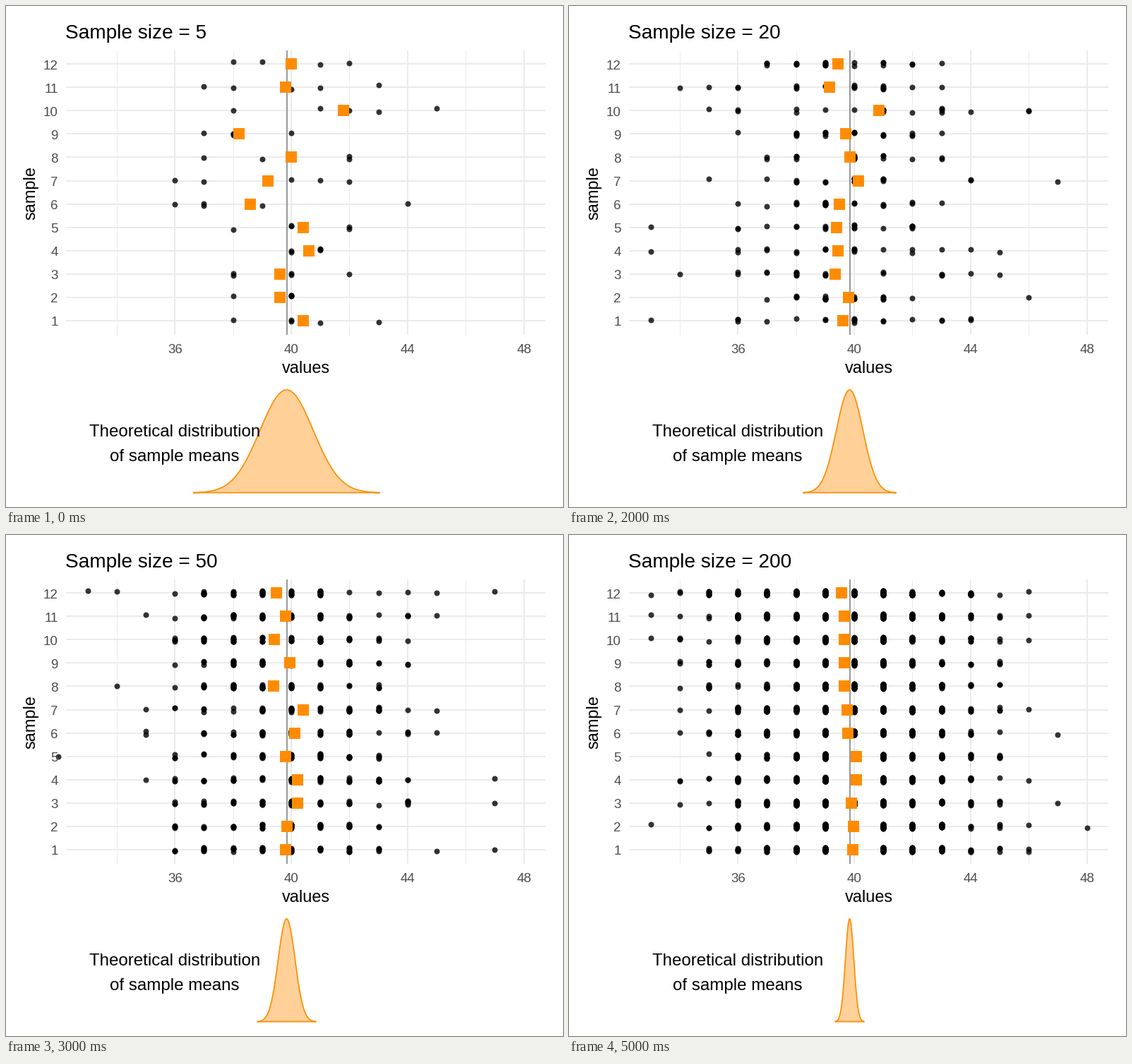
These frames come from a looping animation (789x710 px, 6000 ms). A matplotlib script:

```python
import matplotlib.pyplot as plt
import numpy as np
from matplotlib.animation import FuncAnimation

W, H, DPI = 789, 710, 64
PT = 72 / DPI  # points per pixel
ORANGE, GRID, GREY = "#FF8C00", "#EBEBEB", "#4D4D4D"
TOP, BOTTOM = 63, 466  # panel edges
MEAN, SD = 39.84, 2.15
JITTER = 3.2
ROWS = np.arange(12, 0, -1)

# Mean of each sample, from number 12 down to 1, by sample size.
MEANS = {
    5: [40, 39.8, 41.8, 38.2, 40, 39.2, 38.6, 40.4, 40.6, 39.6, 39.6, 40.4],
    10: [40.4, 39.3, 40.4, 39.7, 39.7, 39.7, 40.3, 39.2, 40.6, 39.9, 39.6, 39.6],
    20: [39.45, 39.15, 40.85, 39.7, 39.85, 40.15, 39.5, 39.4, 39.45, 39.35, 39.8, 39.6],
    50: [39.5, 39.8, 39.42, 39.96, 39.38, 40.4, 40.12, 39.8, 40.22, 40.22, 39.84, 39.8],
    100: [39.6, 40.16, 39.87, 40.27, 39.71, 39.6, 39.9, 39.32, 40.34, 39.89, 39.71, 39.71],
    200: [39.57, 39.65, 39.66, 39.66, 39.65, 39.76, 39.79, 40.08, 40.07, 39.9, 39.97, 39.94],
}
SIZES = list(MEANS)


def px(v):
    return 239.3 + (np.asarray(v) - 36) * 41.2


def py(row):
    return 445.8 - (np.asarray(row) - 1) * 33.05


def draw_sample(n, mean, rng):
    """Whole-number draws nudged until they have the given mean."""
    values = np.rint(rng.normal(mean, SD, n))
    gap = int(round(mean * n - values.sum()))
    for k in rng.integers(0, n, abs(gap)):
        values[k] += np.sign(gap)
    return values


def all_dots(n):
    rng = np.random.default_rng(n)
    x, y = [], []
    for row, mean in zip(ROWS, MEANS[n]):
        x.extend(px(draw_sample(n, mean, rng)))
        y.extend(py(row) + rng.uniform(-JITTER, JITTER, n))
    return x, y


def bell(n):
    z = np.linspace(-3.5, 3.5, 240)
    x = px(MEAN + z * 2.05 / np.sqrt(n))
    return np.column_stack([x, 690 - 146 * np.exp(-z ** 2 / 2)])


DOTS = {n: all_dots(n) for n in SIZES}

plt.rcParams["font.family"] = "Liberation Sans"
fig = plt.figure(figsize=(W / DPI, H / DPI), dpi=DPI, facecolor="white")
ax = fig.add_axes([0, 0, 1, 1])
ax.set(xlim=(0, W), ylim=(H, 0))
ax.axis("off")


def line(x, y, width, color=GRID, z=1):
    ax.plot(x, y, color=color, lw=width * PT, zorder=z, solid_capstyle="butt")


def text(x, y, s, size, ha="center", color="black", **kw):
    return ax.text(x, y, s, size=size * PT, ha=ha, va="baseline",
                   color=color, zorder=8, **kw)


def markers(shape, size, color, z, **kw):
    return ax.plot([], [], shape, ms=size * PT, mfc=color, mew=0,
                   zorder=z, **kw)[0]


for v in range(34, 49, 2):
    major = v % 4 == 0
    line([px(v)] * 2, [TOP, BOTTOM], 2 if major else 1)
    if major:
        text(px(v), 492, str(v), 18.7, color=GREY)
for row in ROWS:
    line([85, 764], [py(row)] * 2, 2)
    text(74, py(row) + 7.5, str(row), 18.7, ha="right", color=GREY)
line([px(MEAN)] * 2, [TOP, BOTTOM], 1.6, "#7F7F7F", 2)

title = text(84, 46, "", 28, ha="left")
text(424.5, 520, "values", 23.5)
text(41.5, 265, "sample", 23.5, rotation=90, rotation_mode="anchor")
text(239.4, 610, "Theoretical distribution", 24.1)
text(239, 645, "of sample means", 24.1)

dots = markers("o", 8, "black", 3, alpha=.8)
squares = markers("s", 15.5, ORANGE, 4)
hill, = ax.fill([0], [0], fc="#FFD199", ec=ORANGE, lw=1.7 * PT, zorder=5)


def update(i):
    n = SIZES[i]
    title.set_text(f"Sample size = {n}")
    dots.set_data(*DOTS[n])
    squares.set_data(px(MEANS[n]), py(ROWS))
    hill.set_xy(bell(n))
    return title, dots, squares, hill


anim = FuncAnimation(fig, update, frames=len(SIZES), interval=1000,
                     repeat=True, repeat_delay=0)
plt.show()
```
